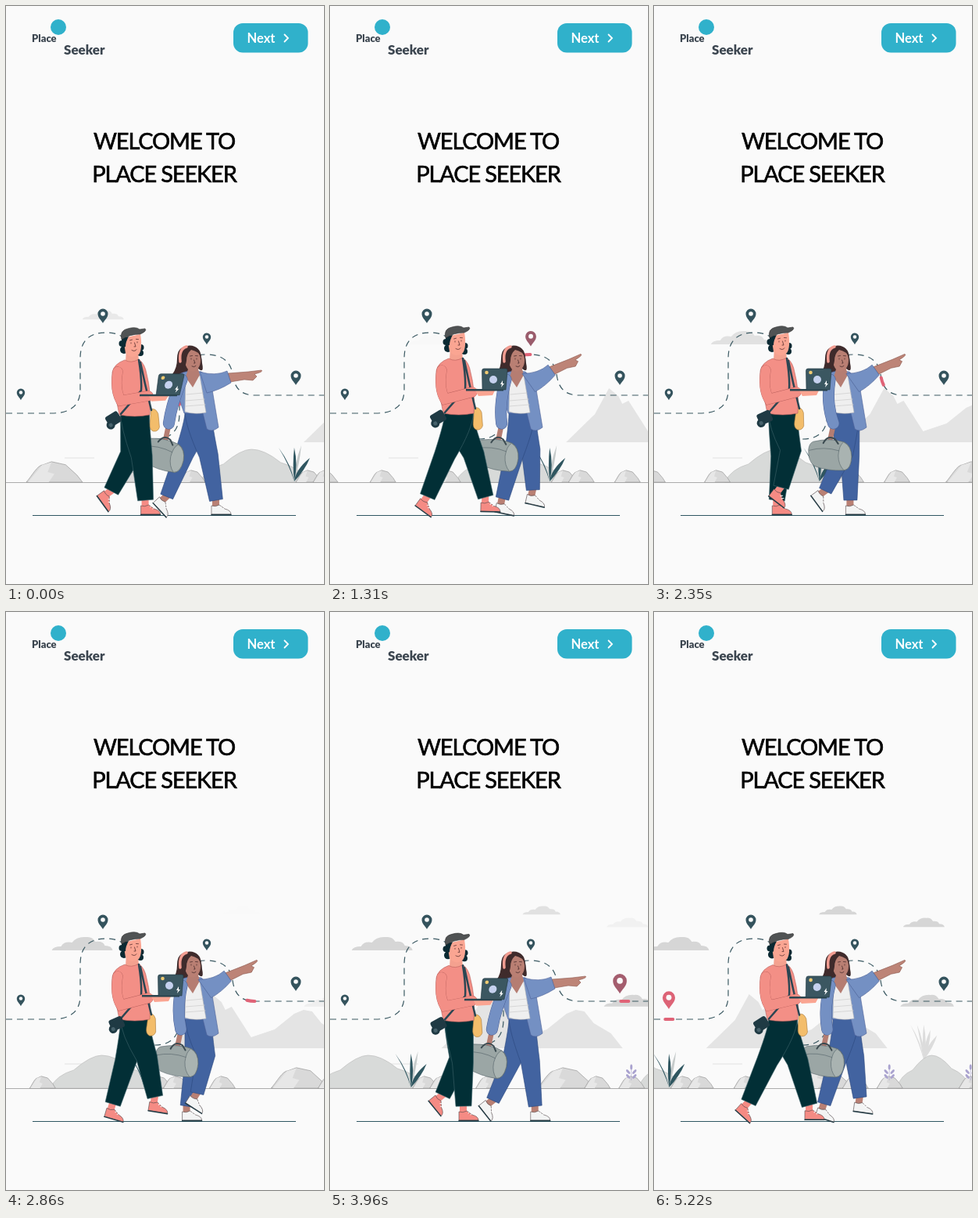
Write an HTML page that moves like this. It is 407 by 738 pixels and loops after 5.26 s.

```html
<!DOCTYPE html>
<html lang="en">
<head>
<meta charset="utf-8">
<title>Welcome</title>
<style>
html, body { margin: 0; width: 100%; height: 100%; overflow: hidden; background: #fafafa; }
svg { display: block; width: 100%; height: 100%; font-family: Lato, "Open Sans", sans-serif; }
.title { font-size: 29px; letter-spacing: -1.15px; text-anchor: middle; stroke: #000; stroke-width: .6; }
.logo { font-weight: 900; fill: #3c4650; }
.line { fill: none; stroke-linecap: round; }
.thin { stroke-width: .6; }
</style>
</head>
<body>
<svg viewBox="0 0 407 738">
  <circle cx="67" cy="27" r="10" fill="#30b1cb"/>
  <text class="logo" x="33" y="46" font-size="13">Place</text>
  <text class="logo" x="74" y="62" font-size="17">Seeker</text>
  <rect x="291" y="22" width="95.500" height="37.500" rx="12" fill="#30b1cb"/>
  <text x="308.500" y="47" font-size="16.500" font-weight="700" fill="#fff">Next</text>
  <path class="line" d="M356.500 36.500L361 41L356.500 45.500" stroke="#fff" stroke-width="1.800"/>
  <text class="title" x="202.500" y="183">WELCOME TO</text>
  <text class="title" x="202.500" y="225">PLACE SEEKER</text>

  <g id="clouds" fill="#d6d6d6"></g>
  <path id="hills" fill="#e4e4e4" d="M-55 557L-18 521L0 488L12 498L17 508L25 504L50 543L80 533L105 513L117 508L128 510L140 525L162 538L177 557Z"/>
  <path d="M75 577H113" stroke="#e2e2e2"/>
  <g id="ground" class="thin"></g>
  <path d="M0 608.500H407" stroke="#999" stroke-width=".8"/>
  <path id="route" fill="none" stroke="#3c5a63" stroke-width="1.200" stroke-dasharray="8 6"
    d="M0 520H58Q95 520 95 490V450Q95 417 128 417Q160 417 162 450V520Q165 553 190 553Q222 553 222 520V475Q222 445 256 445Q286 445 290 470Q293 497 318 497H407"/>
  <path id="spot" class="line" stroke="#e06377" stroke-width="4"/>
  <g id="pins"></g>
  <path d="M34 650.500H371" stroke="#2f5662" stroke-width="1.200"/>

  <g id="woman">
    <g id="legsW"></g>
    <path fill="#3f2b2c" d="M233 434Q219 435 219 450Q219 462 213 470Q222 477 234 467L246 463Q254 470 251 456Q250 434 233 434Z"/>
    <path class="thin" fill="#7490c3" stroke="#4c6197" d="M222 470Q232 464 250 467L262 478L272 538Q263 545 257 540L252 520H228L221 500Z"/>
    <path class="thin" fill="#efefef" stroke="#bbb" d="M230 475L248 472L256 519Q242 522 229 518Z"/>
    <path class="line" stroke="#ccc" stroke-width=".7" d="M231 496L252 494M230 504L254 502M230 511L255 509"/>
    <path fill="#b57d72" d="M234 460L245 460L248 471L239 487L230 474Z"/>
    <ellipse cx="239" cy="452.500" rx="10" ry="14" fill="#b97f73"/>
    <path fill="#3f2b2c" d="M227 464Q221 434 235 433.500Q249 434 250 449Q247 441 237 439Q231 444 231 453Q230 460 227 464Z"/>
    <path class="line" stroke="#f29d92" stroke-width="3.500" d="M223 454Q221 438 231 435"/>
    <path class="line" stroke="#4a2d2d" stroke-width=".8" d="M237 450v1M244 450v1M235.500 447l3-.5M242.500 446.500l3 .3M240.500 452l1.500 4h-1.500M238 460q3 2 5-.5"/>
    <g id="point">
      <path class="thin" fill="#bd8477" stroke="#8d5a50" d="M284 469L310 467L327 465Q330 467 318 470L321 473L316 478L305 477L287 480Z"/>
      <path class="thin" fill="#7490c3" stroke="#4c6197" d="M248 467Q268 473 283 466L288 481Q272 491 257 494Z"/>
    </g>
    <path id="wrist" class="line" stroke="#b57d72" stroke-width="6.500"/>
    <path id="sleeveEdge" class="line" stroke="#4c6197" stroke-width="15"/>
    <path id="sleeve" class="line" stroke="#7490c3" stroke-width="14"/>
    <g id="bag" class="thin" stroke="#56646a">
      <path fill="#9ba6a5" d="M-22 2Q0-3 18 3Q27 8 27 22Q26 38 17 39Q-4 40-21 33Q-29 26-28 12Q-27 4-22 2Z"/>
      <path fill="#a9b3b1" d="M17 3Q27 8 27 22Q26 38 17 39Q10 32 10 20Q11 7 17 3Z"/>
      <path class="line" d="M-27 13Q-8 8 11 14"/>
      <path class="line" d="M-9 4Q-3-7 6-1L10 5" stroke="#3b4a50" stroke-width="2"/>
    </g>
  </g>

  <g id="man">
    <g id="legsM"></g>
    <g id="manTop">
      <path id="mat" class="thin" fill="#f3bd6b" stroke="#a9793a" d="M-4-14Q2-16 5-8L6 9Q4 15-2 14Q-7 12-6 4Z"/>
      <path fill="#f4a18f" d="M154 436L169 438L170 453L160 457L153 452Z"/>
      <path class="thin" fill="#f38f86" stroke="#b95f5b" d="M152 450Q138 455 136 466Q135 486 141 500L145 520Q165 524 184 520Q186 490 180 468Q178 455 170 449Q160 455 152 450Z"/>
      <path class="line" stroke="#2b4653" stroke-width="2.500" d="M170 450Q174 475 173 489L147 519M172 453Q178 482 186 514"/>
      <g fill="#0b2a33">
        <circle cx="148.500" cy="429" r="4"/><circle cx="151" cy="437" r="5"/>
        <circle cx="172.500" cy="434" r="4"/><circle cx="172" cy="441" r="4"/>
      </g>
      <path fill="#faa592" d="M150 422L172 417Q175 436 170 443Q161 450 153 441Z"/>
      <path fill="#0b2a33" d="M148 422L157 420Q153 427 153 433L148 434Z"/>
      <path class="thin" fill="#505354" stroke="#333" d="M148 424Q145 412 156 410Q166 407 171 411L178 410Q181 413 172 417Q158 417 148 424Z"/>
      <path class="line" stroke="#5a3030" stroke-width=".8" d="M160 428v1M168 427v1M158.500 425l3-.8M166.500 423.500l3 .2M164.500 428l1.500 5h-2M161 437.500q4 2.500 6-.8"/>
      <g id="camera" fill="#1f3a44">
        <rect x="-9" y="-8" width="18" height="15" rx="3"/>
        <circle cx="-7" cy="4" r="5.500"/><circle cx="-7" cy="4" r="2.500" fill="#47626c"/>
      </g>
      <path id="armEdge" class="line" stroke="#b95f5b" stroke-width="13.200"/>
      <path id="arm" class="line" stroke="#f38f86" stroke-width="12.500"/>
      <g id="laptop">
        <path fill="#faa592" d="M184 488L200 491L211 491L208 497L190 498Z"/>
        <path fill="#2b4650" d="M174 489H222V491.500H174Z"/>
        <path class="thin" fill="#3b5761" stroke="#1f3740" d="M197 463H225Q227.500 463 227 466L225 490H195L194.500 466Q194.500 463 197 463Z"/>
        <circle cx="209" cy="477" r="5" fill="#c5d1ee"/><circle cx="200.500" cy="468" r="2.300" fill="#efcb72"/>
        <path fill="#fff" d="M221 478l-3 5h2l-1 4l4-5h-2Z"/>
      </g>
    </g>
  </g>
</svg>
<script>
const $ = id => document.getElementById(id);
const set = (id, a) => { for (const k in a) $(id).setAttribute(k, a[k]); };
const clamp = v => Math.max(0, Math.min(1, v));
const smooth = v => { v = clamp(v); return v * v * (3 - 2 * v); };
const wave = v => Math.cos(2 * Math.PI * v);
const { sin, cos, PI } = Math;
const LOOP = 5260, STEP = 1900;
const GROUND = .067, HILLS = .0602, CLOUD = .028, SPOT = .058;
const LIFE = 6000, FADE = 1700;

const clouds = [
  { born: -5150, x: 242, y: 388, s: .68 },
  { born: 1200, x: 105, y: 414, s: 1 },
  { born: 2300, x: 397, y: 488, s: .88 },
  { born: 2800, x: 279, y: 375, s: .62 },
  { born: 3500, x: 367, y: 390, s: .68 }
];
$('clouds').innerHTML = clouds.map(() =>
  '<path d="M0 18Q2 13 12 13Q16 6 26 8Q32 0 44 1Q52 0 56 7Q66 6 68 12Q77 12 78 18Z"/>').join('');

const pins = [[124, 396, 1], [257, 425, .8], [371, 475, 1], [19, 496, .8]];
$('pins').innerHTML = pins.map(() => '<g><path d="M0 9C-2 5-6.500 2-6.500-3A6.500 6.500 0 0 1 6.500-3C6.500 2 2 5 0 9Z"/><circle cy="-3" r="2.800" fill="#fafafa"/></g>').join('');

function rock(x, w) {
  const h = 6 + w * .28;
  const shape = 'c.1-.3.2-.85.3-.85l.15-.15l.25.15l.2.5l.1.35Z', face = 'l.25-.83l.17-.14l-.07.47l.12.1l-.1.4Z';
  return `<g transform="translate(${x} 608) scale(${w} ${h})">
    <path d="M0 0${shape}" fill="#d9d9d9" stroke="#8d8d8d" vector-effect="non-scaling-stroke"/>
    <path d="M.03 0${face}" fill="#e7e7e7"/></g>`;
}
const mound = (x, w) => `<path transform="translate(${x} 608) scale(${w} 42)" fill="#d8dad9" stroke="#bbb" vector-effect="non-scaling-stroke"
  d="M0 0Q.06-.4.22-.55Q.38-1 .48-1Q.6-1 .75-.6Q.96-.4 1 0Z"/>`;
const blade = (x, y, dx, h, w, fill) =>
  `<path fill="${fill}" d="M${x} ${y}Q${x + dx * .2 - w / 2} ${y - h * .5} ${x + dx} ${y - h}Q${x + dx * .45 + w} ${y - h * .5} ${x} ${y}Z"/>`;
function tuft(x, y, n, spread, h, fill) {
  let out = '';
  for (let i = 0; i < n; i++) {
    const u = 2 * i / (n - 1) - 1;
    out += blade(x, y, u * spread, h * (1 - .15 * (u + Math.abs(u))), 5, fill);
  }
  return out;
}
function sprig(x) {
  let out = `<path d="M${x} 598V580" stroke="#aaa3cf"/>`;
  for (let i = 0; i < 5; i++) {
    const side = i ? (i % 2 ? -1 : 1) : 0, y = 581 + 6 * Math.ceil(i / 2);
    out += `<ellipse rx="1.500" ry="3.500" fill="#aaa3cf" transform="translate(${x + 4 * side} ${y}) rotate(${42 * side})"/>`;
  }
  return out;
}
$('ground').innerHTML = tuft(695, 572, 5, 17, 45, '#dcdcdc') + mound(248, 138) + mound(660, 94) +
  [26, 531].map(x => rock(x, 72)).join('') +
  [139, 222, 371, 393, 452, 591, 635, 740].map(x => rock(x, 33)).join('') +
  blade(369, 607, 9, 46, 3, '#c6cbcb') + tuft(369, 607, 3, 20, 43, '#2f5660') + sprig(651) + sprig(755);

const people = {
  M: { hip: [165, 520], back: 115, stride: 90, width: [18.5, 13.5, 10], cloth: '#022f36', edge: '#41666c', skin: '#f58b84', shoe: '#f58b84' },
  W: { hip: [246, 518], back: 201, stride: 74, width: [17, 12, 8.5], cloth: '#4263a0', edge: '#2b477c', skin: '#b98074', shoe: '#f3f4f4' }
};

// first half of the cycle: foot on the ground; second half: foot swinging forward
function foot(phase) {
  const p = phase % 2, q = p - 1;
  if (p < 1) {
    const peel = clamp((p - .58) / .42);
    return { travel: 1 - p, lift: 4 * peel, tilt: 45 * peel, bend: 2 };
  }
  return {
    travel: smooth(q * 1.08),
    lift: 4 * (1 - q) + 13 * sin(PI * q),
    tilt: 47 * cos(PI * q / 2) + 10 * sin(2 * PI * q),
    bend: 2 + 10 * Math.max(0, sin(PI * 1.35 * q))
  };
}
function leg(c, phase) {
  const { travel, lift, tilt, bend } = foot(phase);
  const x = c.back + travel * c.stride, y = 643 - lift, r = tilt * PI / 180;
  const ax = x - 6 * cos(r) + 12 * sin(r), ay = y - 6 * sin(r) - 12 * cos(r);
  const [hx, hy] = c.hip, [w0, w1, w2] = c.width;
  const line = Math.atan2(ay - hy, ax - hx);
  const kx = (hx + ax) / 2 + bend * sin(line), ky = (hy + ay) / 2 - bend * cos(line);
  const thigh = Math.atan2(ky - hy, kx - hx), shin = Math.atan2(ay - ky, ax - kx);
  const at = (px, py, dir, w) => `${px + w * sin(dir)} ${py - w * cos(dir)}`;
  return `<g transform="translate(${x} ${y}) rotate(${tilt})">
      <path fill="${c.skin}" d="M-11-14H-2V-3H-11Z"/>
      <path class="thin" fill="${c.shoe}" stroke="#54484b" d="M-12 6L-12-5Q-7-3-2-6L5-1Q13 1 13 6Z"/>
      <path class="line" stroke="#243c45" stroke-width="1.400" d="M-12 6.500H13"/>
      <path class="line" stroke="#fff" stroke-width="1" d="M0-3l2-2M3-1l2-2"/></g>
    <path class="thin" fill="${c.cloth}" stroke="${c.edge}" stroke-linejoin="round" d="M${hx + w0} ${hy}Q${at(hx, hy + 14, thigh, w0)} ${at(kx, ky, line, w1)}L${at(ax, ay, shin, w2)}L${at(ax, ay, shin, -w2)}L${at(kx, ky, line, -w1)}Q${at(hx, hy + 14, thigh, -w0)} ${hx - w0} ${hy}Z"/>`;
}
const legs = (c, phase) => leg(c, phase + 1) + leg(c, phase);

const route = $('route'), routeLength = route.getTotalLength(), lap = routeLength + 23;
set('spot', { d: route.getAttribute('d'), 'stroke-dasharray': `10 ${lap - 10}` });

function draw(t) {
  clouds.forEach(({ born, x, y, s }, i) => {
    const age = t - born, el = $('clouds').children[i];
    el.setAttribute('transform', `translate(${x - CLOUD * age} ${y}) scale(${s})`);
    el.setAttribute('opacity', clamp(Math.min(age, LIFE - age) / FADE));
  });
  set('hills', { transform: `translate(${436 - HILLS * t} 0)` });
  set('ground', { transform: `translate(${-GROUND * t} 0)` });

  // a pin lights up while the spot passes below it
  const s = (routeLength - 3 + (t - 4440) * SPOT) % lap, spot = route.getPointAtLength(s);
  set('spot', { 'stroke-dashoffset': 5 - s });
  pins.forEach(([x, y, size], i) => {
    const near = spot.y > y && spot.y < y + 30 ? clamp(1 - Math.abs(spot.x - x) / 15) : 0;
    const el = $('pins').children[i];
    el.setAttribute('transform', `translate(${x} ${y}) scale(${size * (1 + .55 * near)})`);
    el.style.fill = `color-mix(in srgb, #e06377 ${near * 100}%, #34535d)`;
  });

  const man = (t - 3370) / STEP + 4;
  const dip = Math.max(0, wave(man - .18)), sway = wave(man - .1);
  $('legsM').innerHTML = legs(people.M, man);
  set('manTop', { transform: `translate(0 ${2 * dip})` });
  set('laptop', { transform: `translate(${-3 * dip} ${5 * dip}) translate(210 490) skewX(${-9 * dip}) translate(-210 -490)` });
  set('camera', { transform: `translate(${140 - 3 * sway} 526) rotate(${-28 - 6 * sway})` });
  set('mat', { transform: `translate(${188 + 3 * sway} 527) rotate(${-3 * sway})` });
  const arm = `M143 465Q139 488 147 502L182 ${493 + 3 * dip}`;
  set('arm', { d: arm });
  set('armEdge', { d: arm });

  const woman = t / STEP;
  $('legsW').innerHTML = legs(people.W, woman);
  set('point', { transform: `rotate(${-17 * (1 - smooth((wave(woman / 2) - .1) / .5))} 255 475)` });
  const swing = 11.5 * wave((t - 2200) / STEP / 2), hand = 214.5 + swing;
  const sleeve = `M225 477Q${hand * .4 + 130} 508 ${hand + 4} 533`;
  set('sleeve', { d: sleeve });
  set('sleeveEdge', { d: sleeve });
  set('wrist', { d: `M${hand + 4} 534L${hand} 553` });
  set('bag', { transform: `translate(${hand} 554) rotate(${5 - swing * .5})` });
}

const start = performance.now();
(function tick() {
  draw((performance.now() - start) % LOOP);
  requestAnimationFrame(tick);
})();
</script>
</body>
</html>
```
